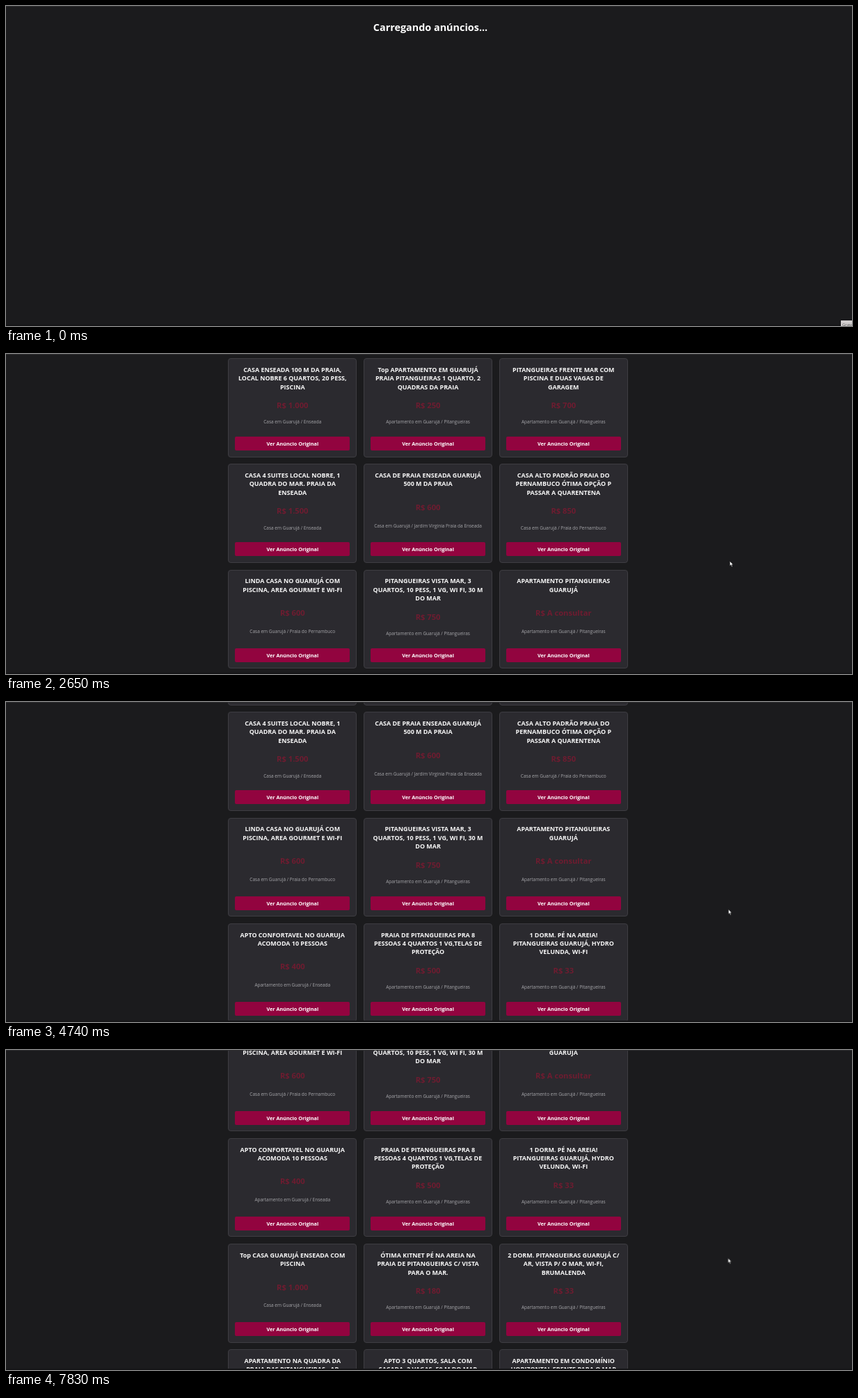
An HTML page that plays this animation: 1216x461 px, repeating every 8 s.

```html
<!DOCTYPE html>
<html lang="pt-BR">
<head>
<meta charset="utf-8">
<title>Anúncios</title>
<style>
html, body { margin: 0; width: 100%; height: 100%; overflow: hidden; background: #1b1b1d; }
#stage {
  position: relative; width: 1216px; height: 461px; overflow: hidden;
  background: #1b1b1d; color: #fff; font-family: "Open Sans", "Noto Sans", sans-serif;
}
#stage * { position: absolute; box-sizing: border-box; white-space: nowrap; }
.loop { animation: 8s step-end -5ms infinite; }
.center { left: 0; width: 100%; text-align: center; }

#loading { left: 2px; top: 21px; font: 700 14.4px/20px "Open Sans", "Noto Sans", sans-serif; animation-name: leave; }
#page { inset: 0; animation-name: arrive; }
#list { left: 0; top: 0; width: 1213px; height: 1100px; animation-name: scroll; }
#heading { left: 484px; top: 29px; font-size: 21.1px; font-weight: 700; line-height: 30px; color: #7d1238; }
#beach { left: 703px; top: 30px; }
#intro { top: 72px; font-size: 7.96px; line-height: 12px; color: #d2d2d4; }

.card {
  width: 185px; height: 142.5px; border: 1px solid #3e3d42; border-radius: 4px;
  background: #2b2a2f;
}
.name { top: 9.8px; font-size: 8.95px; font-weight: 700; line-height: 12.4px; color: #f8f8f8; }
.price { top: 59.2px; font-size: 11.2px; font-weight: 700; line-height: 16px; color: #6e1c30; }
.place { top: 86.3px; font-size: 6.5px; line-height: 10px; color: #a6a6aa; }
.short .price { top: 53.7px; }
.short .place { top: 83.4px; }
.button {
  left: 9px; right: 9px; top: 112px; height: 20px; border-radius: 2px; background: #92043f;
  font-size: 7.28px; font-weight: 700; line-height: 20px; text-align: center;
}

#edge { left: 0; top: 0; width: 100%; height: 1px; background: #2c2c2e; }
#shade { left: 0; bottom: 0; width: 100%; height: 2px; background: #151517; }
#tip {
  left: 1200px; top: 453px; width: 40px; height: 18px; padding-left: 2px; background: #d2cfcf;
  color: #555; font-size: 6px; line-height: 13px; animation-name: fade;
}
#cursor { left: 0; top: 0; animation-name: point; }

@keyframes leave { 0% { visibility: visible } 0.875%, 100% { visibility: hidden } }
@keyframes arrive { 0% { visibility: hidden } 0.875%, 100% { visibility: visible } }
@keyframes fade { 0% { opacity: 1 } 0.875% { opacity: .6 } 1.75% { opacity: .25 } 2.625%, 100% { opacity: 0 } }

/* One wheel notch moves the page by 48px. */
@keyframes scroll {
  0% { transform: none }
  23.25% { transform: translateY(-4px) }
  24.125% { transform: translateY(-34px) }
  25.125% { transform: translateY(-48px) }
  31.375% { transform: translateY(-52px) }
  32.25% { transform: translateY(-82px) }
  33.125% { transform: translateY(-96px) }
  41.25% { transform: translateY(-102px) }
  42.125% { transform: translateY(-117px) }
  43.125% { transform: translateY(-140px) }
  44% { transform: translateY(-144px) }
  49.375% { transform: translateY(-152px) }
  50.25% { transform: translateY(-180px) }
  51.25% { transform: translateY(-192px) }
  57.5% { transform: translateY(-196px) }
  58.375% { transform: translateY(-226px) }
  59.25% { transform: translateY(-240px) }
  66.5% { transform: translateY(-244px) }
  67.375% { transform: translateY(-262px) }
  68.25% { transform: translateY(-283px) }
  69.125% { transform: translateY(-288px) }
  73.625% { transform: translateY(-296px) }
  74.5% { transform: translateY(-324px) }
  75.5% { transform: translateY(-336px) }
  83.5% { transform: translateY(-340px) }
  84.375% { transform: translateY(-370px) }
  85.25% { transform: translateY(-384px) }
  90.75% { transform: translateY(-388px) }
  91.625% { transform: translateY(-418px) }
  92.5%, 100% { transform: translateY(-432px) }
}

@keyframes point {
  0% { transform: translate(1230px, 470px) }
  13.5% { transform: translate(1206px, 450px) }
  14.375% { transform: translate(1150px, 388px) }
  15.25% { transform: translate(1108px, 340px) }
  16.125% { transform: translate(1098px, 326px) }
  21.5% { transform: translate(1097px, 326px) }
  22.375% { transform: translate(1094px, 324px) }
  24.125% { transform: translate(1088px, 320px) }
  26% { transform: translate(1078px, 314px) }
  26.875% { transform: translate(1067px, 307.5px) }
  27.75% { transform: translate(1052px, 301px) }
  28.75% { transform: translate(1043px, 299px) }
  29.625% { transform: translate(1040px, 298px) }
  34% { transform: translate(1039.5px, 298px) }
  36.75% { transform: translate(1038.5px, 298px) }
  44.875% { transform: translate(1038px, 298.3px) }
  95.25% { transform: translate(1038px, 299px) }
  97% { transform: translate(1037.5px, 299.3px) }
  97.875%, 100% { transform: translate(1037.5px, 299.5px) }
}
</style>
</head>
<body>
<div id="stage">
  <div id="loading" class="center loop">Carregando anúncios...</div>
  <div id="page" class="loop">
    <div id="list" class="loop">
      <div id="heading">Temporada Guarujá</div>
      <svg id="beach" width="25" height="24" viewBox="0 0 25 24">
        <path d="M1 9H24V23H1Z" fill="#f5b91c" stroke="#111" stroke-width="1.6"/>
        <path d="M2 9H23V13H2Z" fill="#3aa0dc"/>
        <path d="M12.5 7V19" stroke="#3a3a3c" stroke-width="1.5"/>
        <path d="M3 9A9.5 8 0 0 1 22 9Z" fill="#d8374a" stroke="#111"/>
      </svg>
      <div id="intro" class="center">Últimos anúncios de aluguel de temporada encontrados para o Guarujá-SP.</div>
    </div>
  </div>
  <div id="edge"></div>
  <div id="shade"></div>
  <div id="tip" class="loop">Gravar</div>
  <svg id="cursor" class="loop" width="7" height="10" viewBox="0 0 7 10">
    <path d="M.4.4V7.2L2 5.8L3.1 8.4L4.2 7.9L3.1 5.4H5.2Z" fill="#fff" stroke="#111" stroke-width=".5"/>
  </svg>
</div>
<script>
const house = 'Casa em Guarujá / ';
const flat = 'Apartamento em Guarujá / ';
const enseada = 'Enseada', pitangueiras = 'Pitangueiras', pernambuco = 'Praia do Pernambuco';

// Title lines, price, kind of home, district
const ads = [
  ['CASA ENSEADA 100 M DA PRAIA,|LOCAL NOBRE 6 QUARTOS, 20 PESS,|PISCINA', '1.000', house, enseada],
  ['Top APARTAMENTO EM GUARUJÁ|PRAIA PITANGUEIRAS 1 QUARTO, 2|QUADRAS DA PRAIA', '250', flat, pitangueiras],
  ['PITANGUEIRAS FRENTE MAR COM|PISCINA E DUAS VAGAS DE|GARAGEM', '700', flat, pitangueiras],
  ['CASA 4 SUITES LOCAL NOBRE, 1|QUADRA DO MAR. PRAIA DA|ENSEADA', '1.500', house, enseada],
  ['CASA DE PRAIA ENSEADA GUARUJÁ|500 M DA PRAIA', '600', house, 'Jardim Virginia Praia da Enseada'],
  ['CASA ALTO PADRÃO PRAIA DO|PERNAMBUCO ÓTIMA OPÇÃO P|PASSAR A QUARENTENA', '850', house, pernambuco],
  ['LINDA CASA NO GUARUJÁ COM|PISCINA, AREA GOURMET E WI-FI', '600', house, pernambuco],
  ['PITANGUEIRAS VISTA MAR, 3|QUARTOS, 10 PESS, 1 VG, WI FI, 30 M|DO MAR', '750', flat, pitangueiras],
  ['APARTAMENTO PITANGUEIRAS|GUARUJÁ', 'A consultar', flat, pitangueiras],
  ['APTO CONFORTAVEL NO GUARUJA|ACOMODA 10 PESSOAS', '400', flat, enseada],
  ['PRAIA DE PITANGUEIRAS PRA 8|PESSOAS 4 QUARTOS 1 VG,TELAS DE|PROTEÇÃO', '500', flat, pitangueiras],
  ['1 DORM. PÉ NA AREIA!|PITANGUEIRAS GUARUJÁ, HYDRO|VELUNDA, WI-FI', '33', flat, pitangueiras],
  ['Top CASA GUARUJÁ ENSEADA COM|PISCINA', '1.000', house, enseada],
  ['ÓTIMA KITNET PÉ NA AREIA NA|PRAIA DE PITANGUEIRAS C/ VISTA|PARA O MAR.', '180', flat, pitangueiras],
  ['2 DORM. PITANGUEIRAS GUARUJÁ C/|AR, VISTA P/ O MAR, WI-FI,|BRUMALENDA', '33', flat, pitangueiras],
  ['APARTAMENTO NA QUADRA DA|PRAIA DAS PITANGUEIRAS - AR', '300', flat, pitangueiras],
  ['APTO 3 QUARTOS, SALA COM|SACADA, 2 VAGAS, 50 M DO MAR', '450', flat, pitangueiras],
  ['APARTAMENTO EM CONDOMÍNIO|HORIZONTAL FRENTE PARA O MAR', '500', flat, enseada]
];

function add(parent, className, text = '') {
  const el = document.createElement('div');
  el.className = className;
  el.textContent = text;
  parent.append(el);
  return el;
}

const list = document.getElementById('list');
ads.forEach(([title, price, kind, district], i) => {
  const lines = title.split('|');
  const card = add(list, lines.length < 3 ? 'card short' : 'card');
  card.style.left = 319.3 + (i % 3) * 194.75 + 'px';
  card.style.top = 102 + Math.floor(i / 3) * 152.25 + 'px';
  add(card, 'name center', lines.join('\n')).style.whiteSpace = 'pre';
  add(card, 'price center', 'R$ ' + price);
  add(card, 'place center', kind + district);
  add(card, 'button', 'Ver Anúncio Original');
});
</script>
</body>
</html>
```
